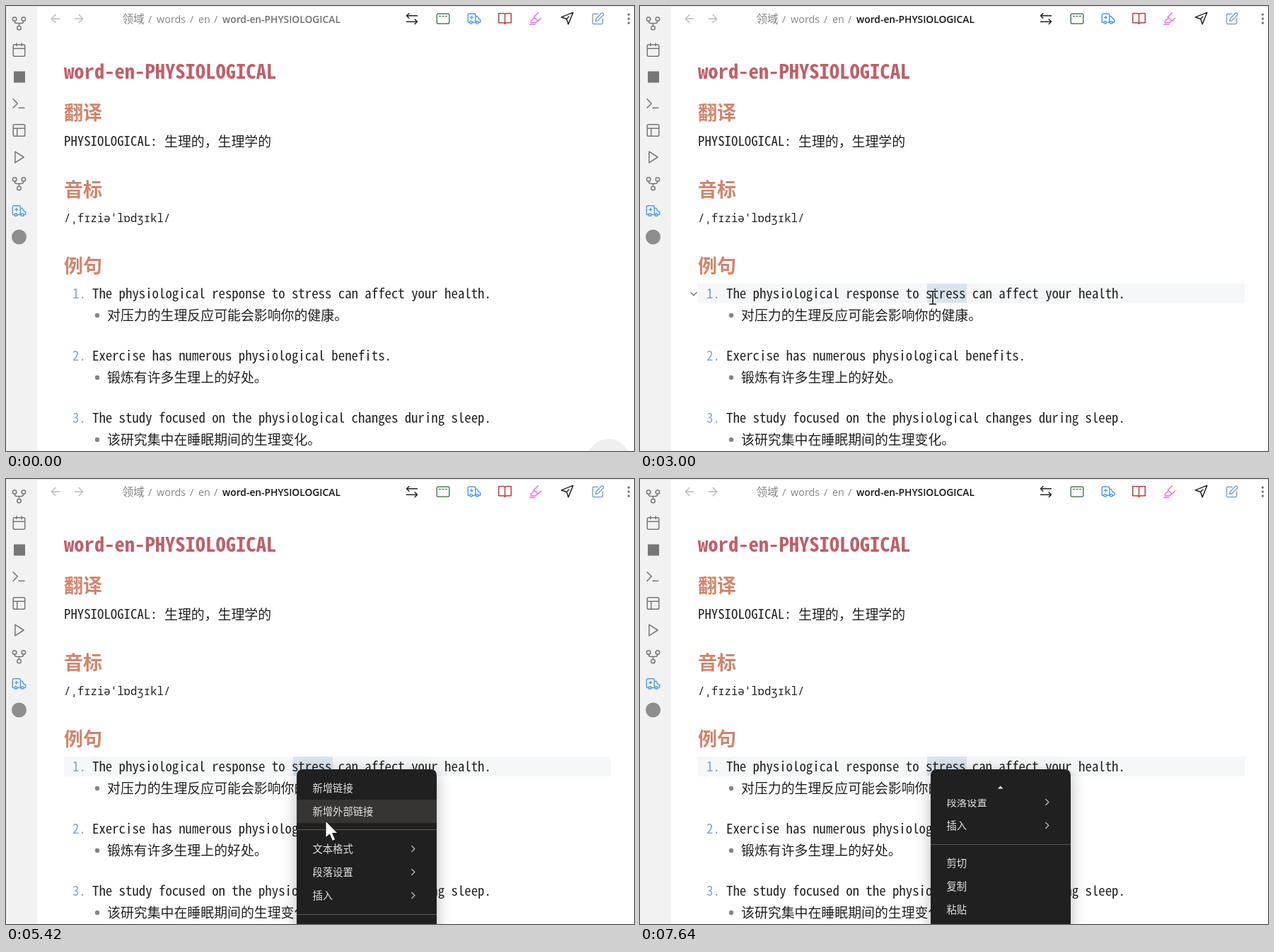
Write an HTML page with a canvas that moves like this. It is 888x630 px and loops after 8000 ms.

```html
<!DOCTYPE html>
<html lang="zh">
<head>
<meta charset="utf-8">
<title>Word note</title>
<style>
html, body { margin: 0; width: 100%; height: 100%; overflow: hidden; background: #fff; }
canvas { display: block; }
</style>
</head>
<body>
<canvas id="stage" width="888" height="630"></canvas>
<script>
const ctx = document.getElementById('stage').getContext('2d');
const LOOP = 8000;
const MONO = '"Noto Sans Mono CJK TC", "Noto Sans Mono CJK SC", "Noto Sans Mono", monospace';
const CJK = '"Noto Sans CJK TC", "Noto Sans CJK SC", sans-serif';
const UI = '"Open Sans", "Noto Sans CJK SC", sans-serif';
const MENU_FONT = '14.3px "Noto Sans CJK SC", sans-serif';
const INK = '#202020';

// Font size at which the monospaced face advances by `pitch` pixels.
function monoFont(pitch, weight = 400) {
  ctx.font = `${weight} 100px ${MONO}`;
  return `${weight} ${pitch * 100 / ctx.measureText('0').width}px ${MONO}`;
}
const bodyFont = monoFont(9.4);
const numberFont = monoFont(9.4, 500);
const titleFont = monoFont(14.3, 700);
const hanFont = `18.9px ${CJK}`;

function text(str, x, y, font, color = INK) {
  ctx.font = font;
  ctx.fillStyle = color;
  ctx.fillText(str, x, y);
}

function rect(x, y, w, h, color) {
  ctx.fillStyle = color;
  ctx.fillRect(x, y, w, h);
}

function disc(x, y, r, color) {
  ctx.fillStyle = color;
  ctx.beginPath();
  ctx.arc(x, y, r, 0, 7);
  ctx.fill();
}

const ring = (x, y, r) =>
  `M${x - r} ${y}a${r} ${r} 0 1 0 ${2 * r} 0a${r} ${r} 0 1 0 ${-2 * r} 0`;
const box = (x, y, w, h, r = 2) =>
  `M${x + r} ${y}h${w - 2 * r}q${r} 0 ${r} ${r}v${h - 2 * r}q0 ${r} ${-r} ${r}` +
  `h${2 * r - w}q${-r} 0 ${-r} ${-r}v${2 * r - h}q0 ${-r} ${r} ${-r}z`;

// Icon outlines on a 24-unit grid.
const icons = {
  fork: ring(5, 5.5, 3) + ring(19, 5.5, 3) + ring(12, 19, 3) +
    'M5 8.5q0 3.5 4 3.5h6q4 0 4-3.5M12 12v4',
  calendar: box(3, 4, 18, 18) + 'M3 10h18M8 2v4M16 2v4',
  terminal: 'M3 5l7 7-7 7M12 19h9',
  layout: box(3, 3, 18, 18) + 'M3 9h18M9 9v12',
  play: 'M5 3l14 9-14 9z',
  ambulance: ring(7, 18, 2) + ring(17, 18, 2) +
    'M5 18H3q-1 0-1-1V6q0-2 2-2h8q2 0 2 2v12H9M14 8h3l2 4 3 1.5V17q0 1-1 1h-2M6 10h4M8 8v4',
  back: 'M19 12H5M12 5l-7 7 7 7',
  forward: 'M5 12h14M12 5l7 7-7 7',
  swap: 'M7 3L3 7l4 4M3 7h18M17 13l4 4-4 4M21 17H3',
  panel: box(2, 4, 20, 16) + 'M6 8h2M11 8h2M16 8h2',
  book: 'M12 6q0-2-2-2H2v15h7q3 0 3 2V6q0-2 2-2h8v15h-7q-3 0-3 2',
  marker: 'M9 11l-5 5v3h8l3-3M21 11l-5 5-7-7 7-7M2 22h9',
  send: 'M22 2L2 10l9 3 3 9z M11 13l4-4',
  edit: 'M12 4H5q-2 0-2 2v13q0 2 2 2h13q2 0 2-2v-7M18 2.5q2-1 3 .5t0 3L12 15l-4 1 1-4z',
  down: 'M5 9l7 7 7-7',
  right: 'M9 5l7 7-7 7'
};

function icon(name, x, y, size, color, weight = 1.5) {
  const k = size / 24;
  ctx.save();
  ctx.translate(x - size / 2, y - size / 2);
  ctx.scale(k, k);
  ctx.lineWidth = weight / k;
  ctx.lineCap = ctx.lineJoin = 'round';
  ctx.strokeStyle = color;
  ctx.stroke(new Path2D(icons[name]));
  ctx.restore();
}

function drawSidebar() {
  const gray = '#777';
  rect(0, 0, 44, 630, '#f2f2f2');
  icon('fork', 18.5, 24.5, 22, gray);
  icon('calendar', 18.5, 62, 22, gray);
  rect(11, 92.5, 16, 16, gray);
  icon('terminal', 18, 138, 21, gray);
  icon('layout', 18.5, 176, 22, gray);
  icon('play', 19, 214, 21, gray);
  icon('fork', 18.5, 251.5, 22, gray);
  icon('ambulance', 18.5, 290, 22, '#4c9ff0');
  disc(18.5, 327, 10.5, '#8e8e8e');
}

function drawHeader(focused) {
  rect(0, 0, 888, 1, '#e2e5e8');
  icon('back', 70, 18, 20, '#b9b9b9', 1.3);
  icon('forward', 103, 18, 20, '#b9b9b9', 1.3);
  const crumb = `14.4px ${UI}`, soft = '#858585';
  text('领域', 164.5, 24, `15.6px ${UI}`, soft);
  text('/', 201, 24, crumb, soft);
  text('words', 213, 24, crumb, soft);
  text('/', 260, 24, crumb, soft);
  text('en', 272, 24, crumb, soft);
  text('/', 294, 24, crumb, soft);
  text('word-en-PHYSIOLOGICAL', 306, 24, `600 13.8px ${UI}`, focused ? '#151515' : '#707070');

  icon('swap', 574, 18, 20, '#222');
  icon('panel', 618, 18, 21, '#4f7f55');
  icon('ambulance', 662, 18, 21, '#4c9ff0');
  icon('book', 705.5, 17.5, 21, '#c23b42');
  icon('marker', 749, 18, 20, '#ee70ee');
  icon('send', 793.5, 17.5, 20, '#222');
  icon('edit', 837, 18, 20, '#7ba0cc');
  for (const y of [12, 18, 24]) disc(880.5, y, 1.7, '#777');
}

const examples = [
  [408, 'The physiological response to stress can affect your health.', '对压力的生理反应可能会影响你的健康。'],
  [496, 'Exercise has numerous physiological benefits.', '锻炼有许多生理上的好处。'],
  [584, 'The study focused on the physiological changes during sleep.', '该研究集中在睡眠期间的生理变化。']
];

function drawNote() {
  text('word-en-PHYSIOLOGICAL', 82, 103, titleFont, '#c05f69');
  [['翻译', 151], ['音标', 260], ['例句', 368]].forEach(([label, y]) =>
    text(label, 82, y + 10, `700 27px ${CJK}`, '#d0856d'));
  text('PHYSIOLOGICAL:', 82, 198, bodyFont);
  text('生理的，生理学的', 224, 198.5, hanFont);
  text('/ˌfɪziəˈlɒdʒɪkl/', 82, 306, '15.67px "Noto Sans Mono", "DejaVu Sans Mono", monospace');

  examples.forEach(([y, english, chinese], i) => {
    text(`${i + 1}.`, 94, y + 6, numberFont, '#86a0cd');
    text(english, 122, y + 6, bodyFont);
    disc(129, y + 30, 3.2, '#858585');
    text(chinese, 143, y + 36.5, hanFont);
  });
}

// Rows: vertical centre, label, opens a submenu; a row without label is a rule.
const menuRows = [
  [438, '新增链接'], [471, '新增外部链接'], [496.5],
  [524, '文本格式', true], [557, '段落设置', true], [590, '插入', true], [616.5],
  [643, '剪切'], [676, '复制'], [709, '粘贴']
];

function drawMenu(scroll, hovered) {
  ctx.save();
  ctx.shadowColor = 'rgba(0,0,0,.28)';
  ctx.shadowBlur = 22;
  ctx.shadowOffsetY = 5;
  ctx.fillStyle = '#202020';
  ctx.fill(new Path2D(box(411, 411, 198, 260, 9)));
  ctx.restore();

  ctx.save();
  ctx.beginPath();
  ctx.rect(411, scroll ? 453 : 411, 198, 220);
  ctx.clip();
  if (hovered) rect(411, 454, 198, 33, '#363533');
  for (const [centre, label, submenu] of menuRows) {
    const y = centre - scroll;
    if (!label) rect(411, y - .5, 198, 1, '#585858');
    else text(label, 433.5, y + 5.4, MENU_FONT, '#e2e2e2');
    if (submenu) icon('right', 575.5, y - .5, 14, '#b8b8b8', 1.3);
  }
  ctx.restore();

  if (scroll) {
    ctx.fillStyle = '#e8e8e8';
    ctx.fill(new Path2D('M506 438.5l3.7-4 3.7 4z'));
  }
}

function drawBeam(x, y) {
  const path = new Path2D(`M${x - 5} ${y - 9}h10M${x} ${y - 9}v18M${x - 5} ${y + 9}h10`);
  ctx.strokeStyle = '#fff';
  ctx.lineWidth = 3;
  ctx.stroke(path);
  ctx.strokeStyle = '#111';
  ctx.lineWidth = 1.6;
  ctx.stroke(path);
}

function drawArrow(x, y) {
  const path = new Path2D(`M${x} ${y}v24l5.5-5 4 9.5 4.2-2-4-9H17z`.replace('H17', `H${x + 17}`));
  ctx.fillStyle = '#fff';
  ctx.strokeStyle = '#111';
  ctx.lineWidth = 1;
  ctx.lineJoin = 'miter';
  ctx.fill(path);
  ctx.stroke(path);
}

// Time, pointer kind, position; each holds until the next.
const pointer = [
  [0], [1400, drawBeam, 526.5, 460], [1610, drawBeam, 456.5, 382],
  [2010, drawBeam, 429.5, 400], [2200, drawBeam, 416, 413], [2410, drawBeam, 414, 413],
  [4820, drawArrow, 412, 411.5], [5420, drawArrow, 452, 484], [5630]
];
const caretToggles = [3410, 4020, 4620, 5220, 5830, 6430, 7030, 7640];
// The caret is held on while the context menu opens.
const caretOn = t => caretToggles.filter(at => t >= at && at !== 4020 && at !== 4620).length % 2 === 1
  && !(t >= 4020 && t < 4620);

function draw(t) {
  const between = (from, to) => t >= from && t < to;
  const selected = t >= 3000;
  rect(0, 0, 888, 630, '#fff');
  drawSidebar();
  drawHeader(selected);

  if (selected) {
    rect(82, 393, 773, 28, '#f6f7f8');
    rect(406, 393, 56, 27, '#d9e4ed');
  }
  drawNote();
  if (t < 1400) disc(852, 644, 31, '#efefef');
  if (between(1610, 2010)) icon('down', 71, 368, 14, '#777');
  if (between(2010, 4820)) icon('down', 76, 407.5, 14, '#777');
  if (caretOn(t)) rect(462, 398, 1, 19, '#111');
  if (between(2810, 3000)) disc(411.5, 412, 14, 'rgba(255,255,0,.47)');

  if (t >= 4820) drawMenu(t >= 6220 ? 99 : 0, between(5420, 5630));
  const [, shape, x, y] = pointer.filter(([at]) => t >= at).pop();
  if (shape) shape(x, y);
}

const start = performance.now();
function tick() {
  draw((performance.now() - start) % LOOP);
  requestAnimationFrame(tick);
}
tick();
</script>
</body>
</html>
```
